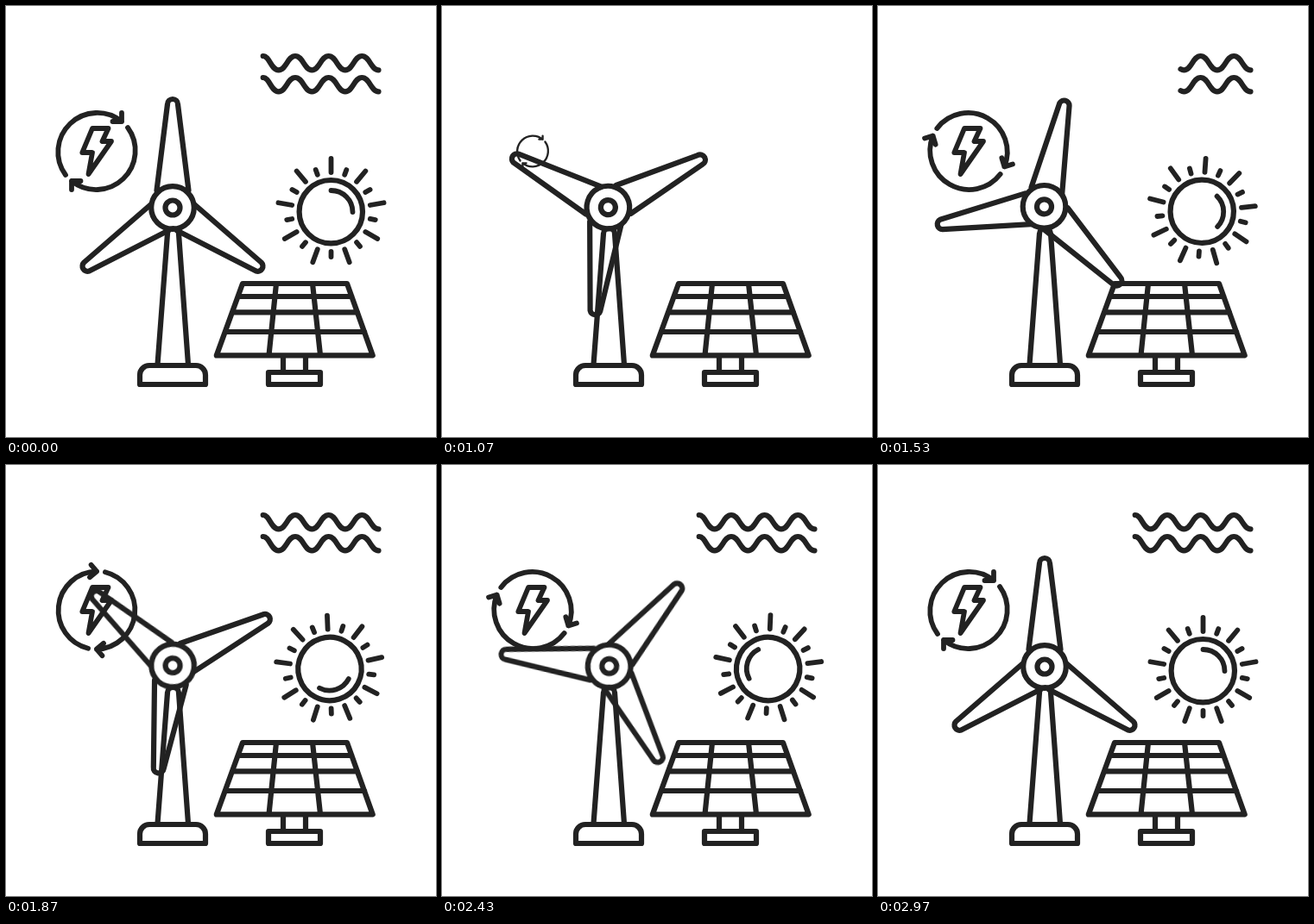
An HTML page for the animation above (3010 ms loop, 498 by 500 pixels).

```html
<!DOCTYPE html>
<html lang="en">
<head>
<meta charset="utf-8">
<title>Renewable energy</title>
<style>
  html, body { margin: 0; width: 100%; height: 100%; overflow: hidden; background: #fff; }
  svg { display: block; width: 100%; height: 100%; }
  svg { fill: none; stroke: #222; stroke-width: 6.2; stroke-linecap: round; stroke-linejoin: round; }
  .thin { stroke-width: 5.8; }

  .tower, .blades, .panel, .cycle, .bolt, .sun, .wave { animation: 3010ms linear infinite; }
  .tower  { transform-origin: 193px 439px; animation-name: tower-in; }
  .blades { transform-origin: 193px 233.3px; animation-name: blades-in, blades-spin; }
  .panel  { transform-origin: 334px 381px; animation-name: panel-in; }
  .cycle  { transform-origin: 105px 168.5px; animation-name: cycle-in, cycle-spin; }
  .bolt   { transform-origin: 105px 168.5px; animation-name: bolt-in, bolt-blink; }
  .sun    { transform-origin: 376.3px 237.2px; animation-name: sun-in, sun-spin; }
  .wave   { stroke-dasharray: 1 2; animation-name: wave-draw; }

  /* Steps follow a 30 fps clock */
  @keyframes tower-in {
    0%, 12.07% { scale: 1; }
    12.08% { scale: .2; animation-timing-function: steps(4); }
    16.5%, 100% { scale: 1; }
  }
  @keyframes blades-in {
    0%, 12.07% { scale: 1; }
    12.08% { scale: 0; }
    16.5% { scale: 0; animation-timing-function: steps(5); }
    22.04%, 100% { scale: 1; }
  }
  @keyframes panel-in {
    0%, 12.07% { scale: 1; }
    12.08% { scale: 0; }
    22.04% { scale: 0; animation-timing-function: steps(10); }
    33.11%, 100% { scale: 1; }
  }
  @keyframes cycle-in {
    0%, 12.07% { scale: 1; }
    12.08% { scale: 0; }
    33.11% { scale: 0; animation-timing-function: steps(5); }
    38.65%, 100% { scale: 1; }
  }
  @keyframes bolt-in {
    0%, 12.07% { scale: 1; }
    12.08% { scale: 0; }
    38.65% { scale: 0; animation-timing-function: steps(5); }
    44.19%, 100% { scale: 1; }
  }
  @keyframes sun-in {
    0%, 12.07% { scale: 1; }
    12.08% { scale: 0; }
    38.65% { scale: 0; animation-timing-function: steps(5); }
    44.19%, 100% { scale: 1; }
  }
  @keyframes blades-spin {
    0% { rotate: 0deg; }
    22.04% { rotate: 0deg; animation-timing-function: steps(69); }
    98.45%, 100% { rotate: 360deg; }
  }
  @keyframes cycle-spin {
    0% { rotate: 0deg; }
    38.65% { rotate: 0deg; animation-timing-function: steps(54); }
    98.45%, 100% { rotate: 360deg; }
  }
  @keyframes sun-spin {
    0% { rotate: 0deg; }
    44.19% { rotate: 0deg; animation-timing-function: steps(49); }
    98.45%, 100% { rotate: 360deg; }
  }
  @keyframes bolt-blink {
    0%, 82.94% { opacity: 1; }
    82.95%, 94.01% { opacity: 0; }
    94.02%, 100% { opacity: 1; }
  }
  @keyframes wave-draw {
    0%, 12.07% { stroke-dashoffset: 0; }
    12.08% { stroke-dashoffset: 1.01; }
    44.19% { stroke-dashoffset: 1.01; animation-timing-function: steps(10); }
    55.26%, 100% { stroke-dashoffset: 0; }
  }
</style>
</head>
<body>
<svg viewBox="0 0 498 500">
  <defs>
    <path id="wave" pathLength="1" d="M431.5 74.3c-9 0-10.3-16.3-19.3-16.3s-10.3 16.3-19.3 16.3-10.3-16.3-19.3-16.3-10.3 16.3-19.3 16.3-10.3-16.3-19.3-16.3-10.3 16.3-19.3 16.3-10.3-16.3-18-16.3"/>
    <path id="blade" d="M168 230L90.3 297.5A6 6 0 0 0 96.3 307.5L188 260.5"/>
    <path id="arrow" d="M69 196A45.3 45.3 0 0 1 134 134M123.5 134H134V124"/>
    <path id="ray" d="M376.5 193V177M392.2 195.8L394.3 190.1"/>
    <g id="rays">
      <use href="#ray"/>
      <use href="#ray" transform="rotate(40 376.5 239)"/>
      <use href="#ray" transform="rotate(80 376.5 239)"/>
    </g>
  </defs>

  <g class="panel">
    <path d="M274 322H395L424.7 405.4H243.8ZM268.6 337H400.4M262 355.4H407M253.8 378H415.2M313 322L304.5 405M355 322L364 405"/>
    <path d="M321 406V424M347 406V424M304 425H364V439H304Z"/>
  </g>

  <g class="tower">
    <path d="M175.5 416L187 264A6.5 6 0 0 1 200 264L211 416"/>
    <path d="M155 439V428A11 11 0 0 1 166 417H220A11 11 0 0 1 231 428V439Z"/>
  </g>

  <g class="cycle thin">
    <use href="#arrow"/>
    <use href="#arrow" transform="rotate(180 105 168.5)"/>
  </g>
  <path class="bolt thin" d="M100 142H118.5L111.5 157H122L95.5 195L100 170H88.3Z"/>

  <g class="blades">
    <path d="M174.5 214L187 114A6 6 0 0 1 199 114L211.5 214"/>
    <use href="#blade"/>
    <use href="#blade" transform="matrix(-1 0 0 1 386 0)"/>
    <circle cx="193" cy="234" r="24.8"/>
    <circle cx="193" cy="234" r="8.5"/>
  </g>

  <g class="sun">
    <circle cx="376.3" cy="238.7" r="36.7"/>
    <g class="thin">
      <path d="M376.5 214A25 25 0 0 1 401.5 239"/>
      <use href="#rays"/>
      <use href="#rays" transform="rotate(120 376.5 239)"/>
      <use href="#rays" transform="rotate(240 376.5 239)"/>
    </g>
  </g>

  <use class="wave" href="#wave"/>
  <use class="wave" href="#wave" y="25"/>
</svg>
</body>
</html>
```
